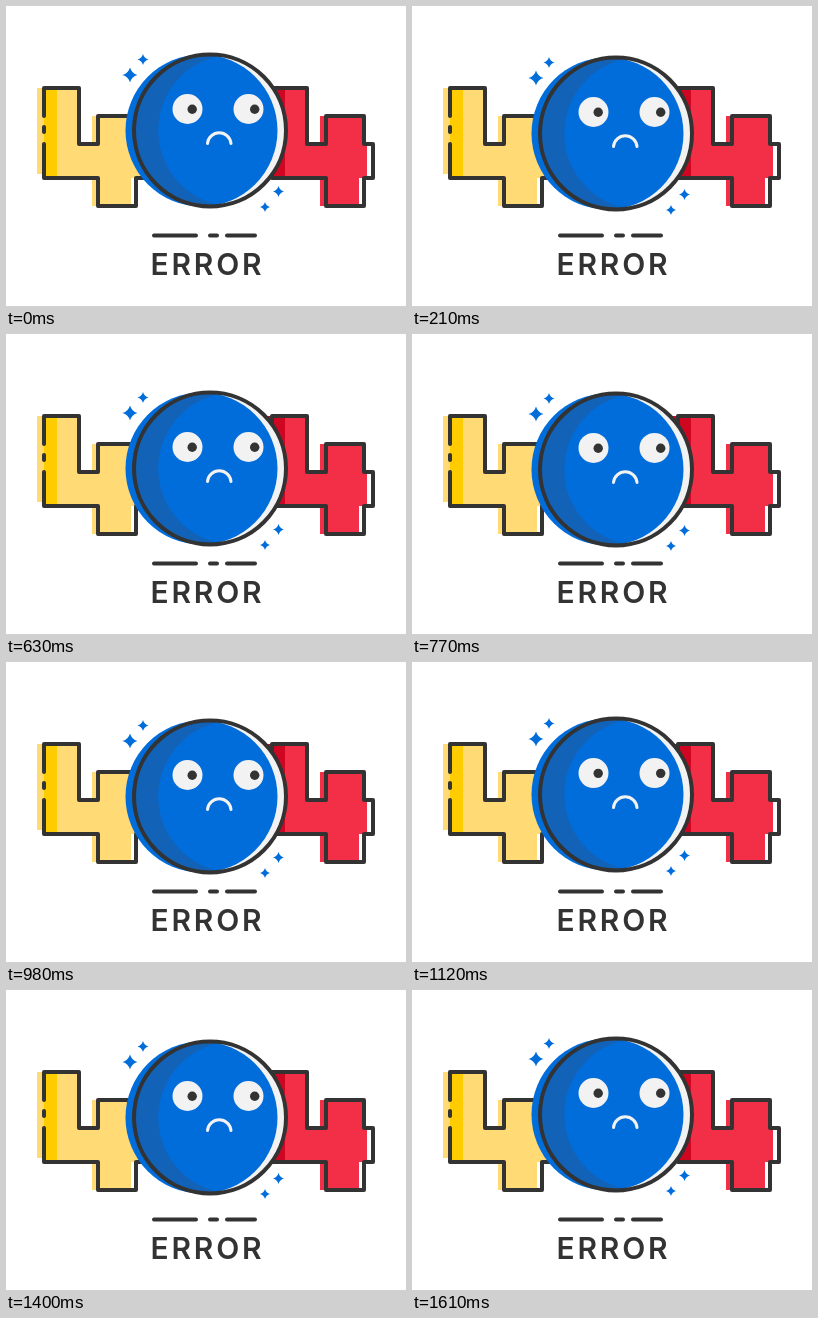
An HTML page for the animation above (1680 ms loop, 400x300 px).

```html
<!DOCTYPE html>
<html lang="en">
<head>
<meta charset="utf-8">
<title>404 error</title>
<style>
  html, body { margin: 0; width: 100%; height: 100%; overflow: hidden; background: #fff; }
  svg { display: block; width: 100%; height: 100%; }
  .line { fill: none; stroke: #333; stroke-width: 4; stroke-linecap: round; stroke-linejoin: round; }
  .blue { fill: #006ddb; }
  .pale { fill: #f2f2f2; }
  text { font: 600 30px Inter, "Open Sans", sans-serif; letter-spacing: 2.8px; fill: #333; }
</style>
</head>
<body>
<svg viewBox="0 0 400 300">
  <defs>
    <path id="star" d="M0-1Q.22-.22 1 0Q.22.22 0 1Q-.22.22-1 0Q-.22-.22 0-1Z"/>
  </defs>

  <!-- left digit -->
  <path fill="#ffda75" d="M31 82H73V138H86V110H140V172H125V200H86V172H38V168H31Z"/>
  <path fill="#fc0" d="M38 82H51V172H38Z"/>
  <path class="line" d="M38 110V82H73V138H92V110H140M38 121V126M38 138V172H92V200H130V172H140"/>

  <!-- right digit -->
  <path fill="#f22f46" d="M250 82H301V138H314V110H358V138H361V172H353V200H314V172H250Z"/>
  <path fill="#ce0622" d="M250 82H279V172H250Z"/>
  <path class="line" d="M266 172V82H301V138H320V110H358V138H367V172H358V200H320V172Z"/>

  <g id="ball">
    <g class="blue">
      <use href="#star" transform="translate(124 69) scale(7.5)"/>
      <use href="#star" transform="translate(137 53.5) scale(5.5)"/>
      <use href="#star" transform="translate(272.5 185.5) scale(5.5)"/>
      <use href="#star" transform="translate(259 201) scale(5)"/>
    </g>
    <circle class="pale" cx="204" cy="124.5" r="76"/>
    <circle class="blue" cx="195.5" cy="124.5" r="76"/>
    <path fill="#1262b8" d="M216 49.5A76 76 0 1 0 216 199.5A76 76 0 0 1 216 49.5Z"/>
    <circle class="line" cx="204" cy="124.5" r="76"/>
    <circle class="pale" cx="181.5" cy="103" r="15"/>
    <circle class="pale" cx="242.5" cy="103" r="15"/>
    <circle fill="#333" cx="186.2" cy="103.3" r="4.7"/>
    <circle fill="#333" cx="248.7" cy="103.3" r="4.7"/>
    <path d="M201.5 137.5A11.8 11.8 0 0 1 225 137.5" fill="none" stroke="#f2f2f2" stroke-width="3" stroke-linecap="round"/>
  </g>

  <path class="line" d="M148 229.5H190M204 229.5H211M221 229.5H249"/>
  <text x="201.4" y="269" text-anchor="middle">ERROR</text>
</svg>
<script>
  const LOOP = 1680, STEP = 70, HOLD = 210, PEAK = 805, DROP = 11;
  const ball = document.getElementById("ball");

  // Nearly linear at the top, easing into the lowest point.
  const ease = v => v + 1.3 * v * (1 - v) * (v - 0.215);

  function draw(now) {
    const t = Math.floor(now % LOOP / STEP) * STEP;
    const y = t < HOLD ? 0 : DROP * ease(1 - Math.abs(t - PEAK) / PEAK);
    ball.setAttribute("transform", `translate(0 ${y})`);
    requestAnimationFrame(draw);
  }
  draw(performance.now());
</script>
</body>
</html>
```
